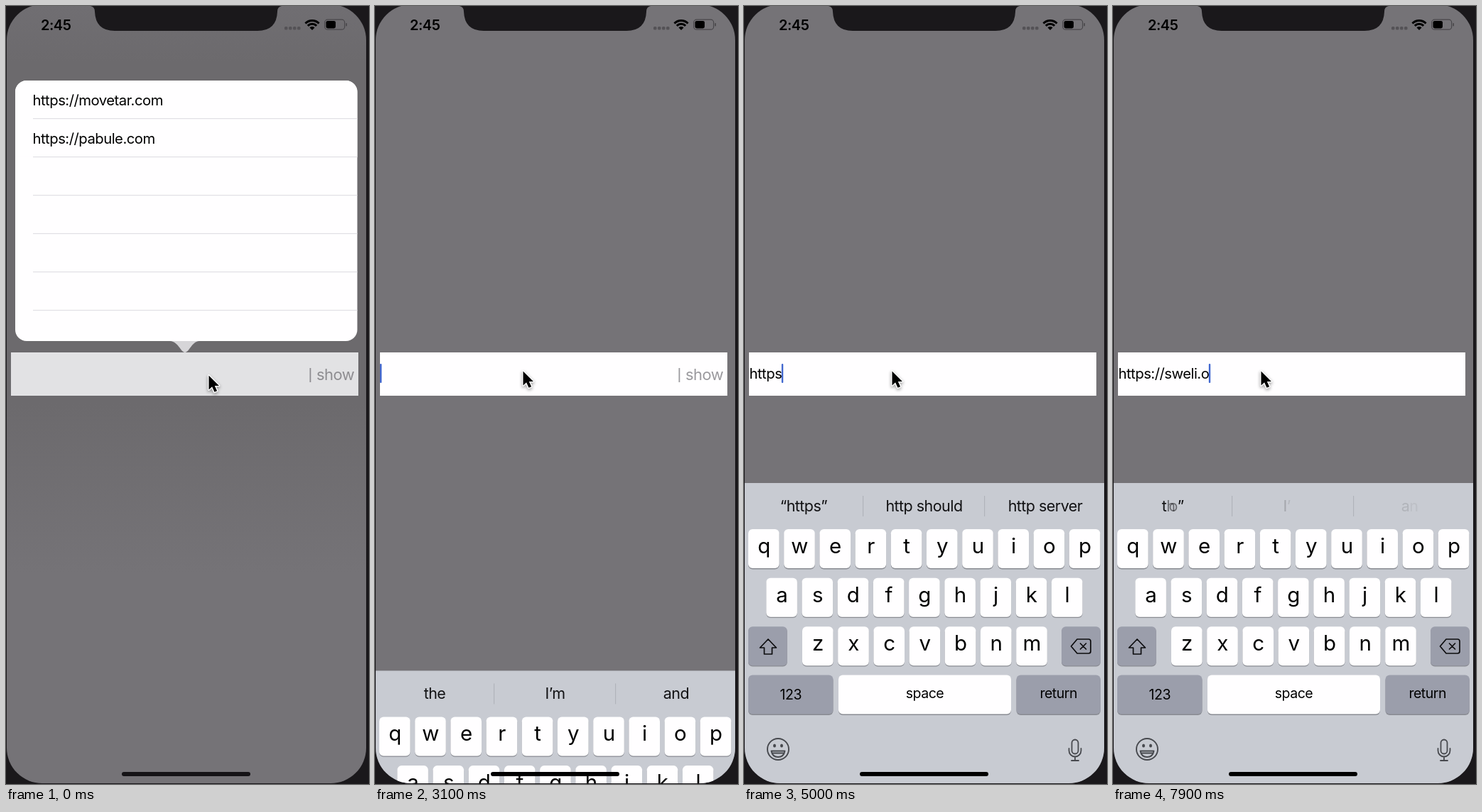
An HTML page with a canvas for the animation above (8 s loop, 511 by 1096 pixels).

```html
<!DOCTYPE html>
<html lang="en">
<head>
<meta charset="utf-8">
<title>Address field</title>
<style>
  html, body { margin: 0; width: 100%; height: 100%; overflow: hidden; background: #1a181b; }
  canvas { display: block; }
</style>
</head>
<body>
<canvas width="511" height="1096"></canvas>
<script>
const ctx = document.querySelector('canvas').getContext('2d');
const LOOP = 8000, STEP = 100;
const BG = '#757377', BLACK = '#1a181b', KEYBOARD_TOP = 672, KEYBOARD_HEIGHT = 424;

const ADDRESS = 'https://sweli.o';
const KEYSTROKES = [3900, 4100, 4300, 4500, 4700, 5200, 5400, 5600, 5900, 6300, 6600, 6800, 7000, 7400, 7600];
const SUGGESTIONS = [
  [0, 'the', 'I’m', 'and'],
  [4300, '“h”', 'he', 'how'],
  [4700, '“https”', 'http should', 'http server'],
  [5400, 'the', 'I’m', 'and'],
  [6100, '“s”', 'so', 'she'],
  [6500, '“sw”', 'sweet', 'swim'],
  [7300, '“sweli”', '', ''],
  [7700, '“o”', '', ''],
  [7900, 'the', 'I’m', 'and'],
];
const POINTER = [[0, 285, 520], [700, 264, 536], [800, 243, 550], [2400, 212, 542], [2500, 208, 514]];

const latest = (list, t) => list.findLastIndex(item => item[0] <= t);

function box(x, y, w, h, r, fill) {
  ctx.beginPath();
  ctx.roundRect(x, y, w, h, r);
  ctx.fillStyle = fill;
  ctx.fill();
}

function setFont(size, weight = 400) {
  ctx.font = `${weight} ${size}px Inter, "Open Sans", sans-serif`;
  ctx.letterSpacing = `${-0.025 * size}px`;
}

function text(str, x, y, size, fill = '#000', align = 'left', weight = 400) {
  setFont(size, weight);
  ctx.textAlign = align;
  ctx.fillStyle = fill;
  ctx.fillText(str, x, y);
}

function stroke(path, color, width) {
  ctx.strokeStyle = color;
  ctx.lineWidth = width;
  ctx.lineCap = ctx.lineJoin = 'round';
  ctx.stroke(new Path2D(path));
}

function fillPath(path, color) {
  ctx.fillStyle = color;
  ctx.fill(new Path2D(path));
}

function drawStatusBar() {
  fillPath('M119 0Q125 1 125 8Q126 35 153 35H354Q381 35 382 8Q382 1 388 0Z', BLACK);
  text('2:45', 49, 33.5, 20, '#000', 'left', 600);
  for (let i = 0; i < 4; i++) box(392 + i * 6, 29, 4.5, 4.5, 1.5, '#545256');

  ctx.save();
  ctx.beginPath();
  ctx.moveTo(431, 34);
  ctx.arc(431, 34, 16, -Math.PI * 0.75, -Math.PI * 0.25);
  ctx.clip();
  ctx.strokeStyle = '#000';
  ctx.lineWidth = 3;
  for (const r of [13.5, 8.7]) {
    ctx.beginPath();
    ctx.arc(431, 34, r, 0, Math.PI * 2);
    ctx.stroke();
  }
  ctx.beginPath();
  ctx.arc(431, 34, 5, 0, Math.PI * 2);
  ctx.fillStyle = '#000';
  ctx.fill();
  ctx.restore();

  ctx.beginPath();
  ctx.roundRect(448.7, 19.2, 28, 14, 4);
  ctx.strokeStyle = '#48464a';
  ctx.lineWidth = 1.2;
  ctx.stroke();
  box(450.5, 21, 13.5, 10.4, 2.3, '#000');
  box(478.4, 24, 1.6, 4.5, 1, '#48464a');
}

function drawPopover(alpha) {
  ctx.save();
  ctx.globalAlpha = alpha;
  box(13, 105, 481.5, 367, 16, '#fffeff');
  ctx.save();
  ctx.clip();
  box(13, 105, 482, 107.5, 0, '#fffeff');
  ctx.fillStyle = '#e1e0e4';
  for (let y = 158; y < 472; y += 54) ctx.fillRect(38, y, 457, 1.2);
  ctx.restore();
  text('https://movetar.com', 37.5, 139.5, 20.3);
  text('https://pabule.com', 37.5, 193.5, 20.3);
  ctx.restore();
  fillPath('M231 472C243 473 246 488 252 488C258 488 261 473 272 472Z', alpha < 1 ? '#b6b4b8' : '#d6d5d8');
}

function drawField(t, typed) {
  ctx.fillStyle = t < 800 ? '#e2e2e4' : t < 900 ? '#ecebed' : '#fffeff';
  ctx.fillRect(7, 488, 489, 61);
  if (typed) {
    text(typed, 7.5, 525, 20.3);
  } else {
    const gray = t < 900 ? '#8e8d91' : '#9b9a9e';
    ctx.fillStyle = gray;
    ctx.fillRect(427.5, 510, 1.8, 20);
    text('show', 437, 526.5, 22, gray);
  }
  if (t >= 3100) {
    setFont(20.3);
    box(7 + ctx.measureText(typed).width, 504, 2.4, 27, 1, '#4268cf');
  }
}

// Glyph-by-glyph blend: the leading letters and the left slot change first.
function drawSuggestions(t, y) {
  const index = latest(SUGGESTIONS, t);
  const current = SUGGESTIONS[index];
  const blending = index > 0 && t < current[0] + STEP;
  [84, 253.5, 424].forEach((center, slot) => {
    const progress = blending ? [1, 0.2, 0.12][slot] : 1;
    const glyphs = (str, alphaOf) => {
      setFont(21.5);
      let x = center - ctx.measureText(str).width / 2;
      [...str].forEach((glyph, i) => {
        ctx.globalAlpha = alphaOf(i);
        text(glyph, x, y, 21.5, '#121214');
        x += ctx.measureText(glyph).width;
      });
      ctx.globalAlpha = 1;
    };
    const shown = i => progress * Math.max(0, 1 - i / 2);
    if (!blending) return text(current[slot + 1], center, y, 21.5, '#121214', 'center');
    glyphs(SUGGESTIONS[index - 1][slot + 1], i => 1 - shown(i));
    glyphs(current[slot + 1], shown);
  });
}

function key(x, y, w, label, size, fill = '#fffeff', drop = 34) {
  box(x, y + 1.4, w, 55, 6, '#898b92');
  box(x, y, w, 55, 6, fill);
  text(label, x + w / 2, y + drop, size, '#000', 'center');
}

function drawKeyboard(t) {
  const decay = 17 * (t - 3023) / 1000;
  const offset = KEYBOARD_HEIGHT * (1 + decay) * Math.exp(-decay);
  const dark = '#9b9eab', icon = '#47494e';
  ctx.save();
  ctx.translate(0, offset);
  ctx.fillStyle = '#c8cbd2';
  ctx.fillRect(0, KEYBOARD_TOP, 511, KEYBOARD_HEIGHT);
  ctx.fillStyle = '#b0b3ba';
  for (const x of [167, 338]) ctx.fillRect(x, 690, 1.2, 29);
  drawSuggestions(t, 712);

  [['qwertyuiop', 6, 737], ['asdfghjkl', 31.3, 805.7], ['zxcvbnm', 82, 874.2]].forEach(([letters, x, y]) =>
    [...letters].forEach((letter, i) => key(x + i * 50.2, y, 43.6, letter, 29.5, '#fffeff', 34)));
  key(6, 874.2, 54.8, '', 20, dark);
  key(447, 874.2, 54.8, '', 20, dark);
  key(6, 942.6, 119.5, '123', 19.5, dark);
  key(133, 942.6, 243, 'space', 19.5, '#fffeff', 32.5);
  key(383.5, 942.6, 118.3, 'return', 19.5, dark, 32.5);

  stroke('M34 892L45.5 904H39.5V913H28.5V904H22.5Z', '#0c0c0e', 1.7);
  stroke('M469 892H485Q488 892 488 895V909Q488 912 485 912H469L460.5 902ZM473.5 898L481.5 906M481.5 898L473.5 906', '#0c0c0e', 1.7);

  stroke('M33 1047a15 15 0 1 0 30 0a15 15 0 1 0 -30 0ZM38.5 1049.5H57.5Q56 1058 48 1058Q40 1058 38.5 1049.5ZM39.5 1052.5H56.5', icon, 1.9);
  fillPath('M41 1042a2 2.6 0 1 0 4 0a2 2.6 0 1 0 -4 0ZM51 1042a2 2.6 0 1 0 4 0a2 2.6 0 1 0 -4 0Z', icon);
  stroke('M461.5 1038a4.5 4.5 0 0 1 9 0V1049a4.5 4.5 0 0 1 -9 0ZM457.5 1046V1049a8.5 8.5 0 0 0 17 0V1046M466 1057.5V1063M461 1063H471', icon, 1.8);
  ctx.restore();
}

function drawPointer(t) {
  const [, x, y] = POINTER[latest(POINTER, t)];
  const arrow = 'M0 0V20L4.6 15.8L8 23.3L11.6 21.7L8.3 14.4H14.5Z';
  ctx.save();
  ctx.translate(x + 0.5, y + 0.5);
  ctx.shadowColor = 'rgba(0,0,0,.4)';
  ctx.shadowBlur = 4;
  ctx.shadowOffsetY = 2;
  stroke(arrow, '#fff', 2.8);
  ctx.shadowColor = 'transparent';
  fillPath(arrow, '#000');
  ctx.restore();
}

function draw(t) {
  const popoverOpen = t < 900;
  const typed = ADDRESS.slice(0, KEYSTROKES.filter(time => time <= t).length);
  ctx.fillStyle = BLACK;
  ctx.fillRect(0, 0, 511, 1096);

  let backdrop = BG;
  if (popoverOpen) {
    backdrop = ctx.createLinearGradient(0, 0, 0, 800);
    backdrop.addColorStop(0, '#706e72');
    backdrop.addColorStop(0.1, '#6c6a6d');
    backdrop.addColorStop(0.7, '#6c6a6d');
    backdrop.addColorStop(1, BG);
  }
  ctx.save();
  box(1, -2, 506, 1097, 50, backdrop);
  ctx.clip();
  drawStatusBar();
  if (popoverOpen) drawPopover(t < 800 ? 1 : 0.855);
  drawField(t, typed);
  if (t >= 3100) drawKeyboard(t);
  box(163, 1079, 181, 6, 3, t >= 3100 ? '#000' : '#151316');
  ctx.restore();
  drawPointer(t);
}

function frame(now) {
  draw(Math.floor(now % LOOP / STEP) * STEP);
  requestAnimationFrame(frame);
}
requestAnimationFrame(frame);
</script>
</body>
</html>
```
